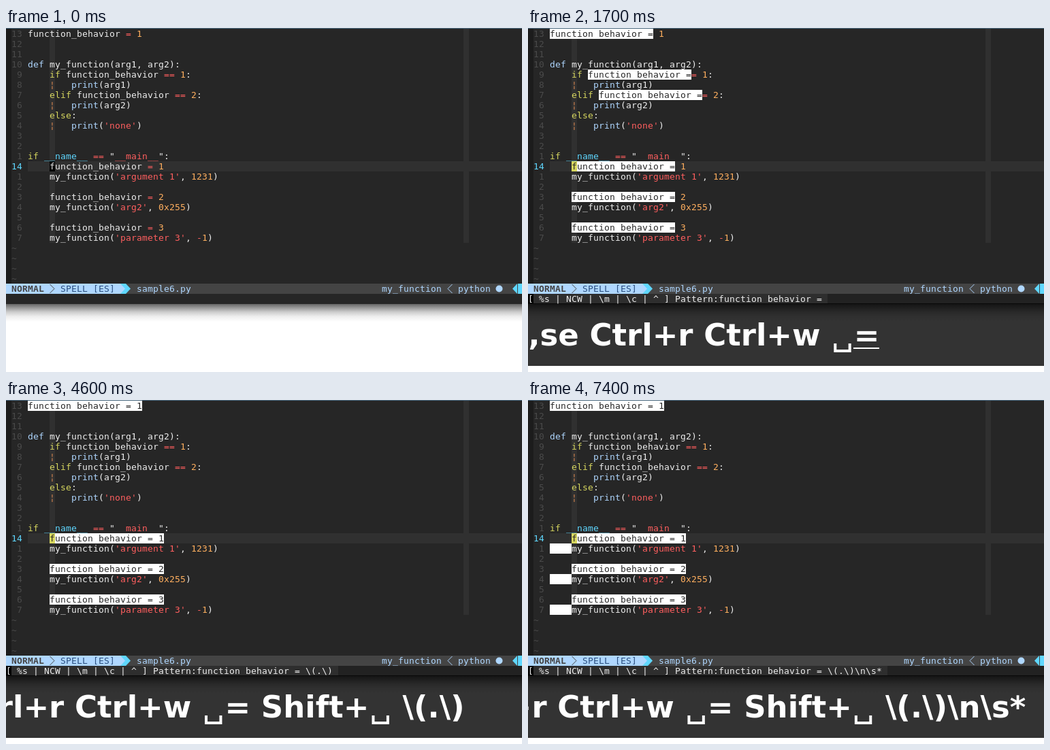
Write an HTML page with a canvas that moves like this. It is 758 by 506 pixels and loops after 8000 ms.

```html
<!DOCTYPE html>
<html lang="en">
<head>
<meta charset="utf-8">
<title>Search pattern in an editor</title>
<style>
  html, body { margin: 0; width: 100%; height: 100%; overflow: hidden; background: #fff; }
  canvas { display: block; }
</style>
</head>
<body>
<canvas id="stage" width="758" height="506"></canvas>
<script>
const ctx = document.getElementById("stage").getContext("2d");
const LOOP = 8000, W = 758, H = 506;
const CELL = 8, ROW = 15, TOP = 1, GUTTER = 32, CURSOR_ROW = 13;
const MONO = '13px "DejaVu Sans Mono", monospace';
const CAPTION = { size: 45, center: 258.4, baseline: 467, boxWidth: 33.4 };

const C = {
  bg: "#262626", fold: "#1c1c1c", line: "#303030", text: "#eeeeee", dim: "#4a4a4a",
  red: "#ff5f5f", yellow: "#d7d75f", orange: "#ffaf5f", pale: "#afd7ff",
  cyan: "#5fd7ff", bar: "#444444", guide: "#d78750", panel: "#333333"
};

const code = `function_behavior = 1


def my_function(arg1, arg2):
    if function_behavior == 1:
    ¦   print(arg1)
    elif function_behavior == 2:
    ¦   print(arg2)
    else:
    ¦   print('none')


if __name__ == "__main__":
    function_behavior = 1
    my_function('argument 1', 1231)

    function_behavior = 2
    my_function('arg2', 0x255)

    function_behavior = 3
    my_function('parameter 3', -1)`;
const lines = code.split("\n");

const syntax = [
  [/'[^']*'|(__)?main(__)?/, C.red],
  [/\b(?:if|elif|else)\b/, C.yellow],
  [/\b(?:print|def)\b/, C.pale],
  [/__name__/, C.cyan],
  [/==?|-/, C.red],
  [/\b\d\w*/, C.orange],
  [/¦/, C.guide]
];

// time, key shown, text typed, typing lag, time at which the underline goes
const keys = [
  [300, ",", "", 0],
  [300, "s", "", 0],
  [500, "e", "", 0, 700],
  [1000, " Ctrl+r", "", 0],
  [1200, " Ctrl+w", "function_behavior", 0],
  [1400, " ␣", " ", 0],
  [1600, "=", "=", 100],
  [1900, " Shift+␣", " ", 0, 2100],
  [2300, " \\", "\\", 0],
  [3100, "(", "(", 0],
  [3200, ".", ".", 0],
  [3900, "\\", "\\", 0, 4100],
  [4400, ")", ")", 0, 4600],
  [5800, "\\", "\\", 100],
  [6100, "n", "n", 100, 6400],
  [6600, "\\", "\\", 0],
  [6700, "s", "s", 0, 6900],
  [7200, "*", "*", 0, 7400]
].map(([at, label, typed, lag, plainAt = LOOP]) => ({ at, label, typed, lag, plainAt }));

const rowTop = row => TOP + row * ROW;

function rect(x, y, w, h, color) {
  ctx.fillStyle = color;
  ctx.fillRect(x, y, w, h);
}

function shape(points, color) {
  ctx.fillStyle = color;
  ctx.beginPath();
  points.forEach(([x, y]) => ctx.lineTo(x, y));
  ctx.fill();
}

function stroke(points, color, width) {
  ctx.strokeStyle = color;
  ctx.lineWidth = width;
  ctx.beginPath();
  points.forEach(([x, y]) => ctx.lineTo(x, y));
  ctx.stroke();
}

function cells(text, x, row, color, bold) {
  ctx.font = (bold ? "bold " : "") + MONO;
  ctx.fillStyle = color;
  [...text].forEach((ch, i) => ctx.fillText(ch, x + i * CELL, rowTop(row) + 12));
}

function lineColors(line) {
  const colors = Array(line.length).fill(C.text);
  const any = new RegExp(syntax.map(([re]) => `(?:${re.source})`).join("|"), "g");
  for (const m of line.matchAll(any)) {
    const [, color] = syntax.find(([re]) => new RegExp(`^(?:${re.source})$`).test(m[0]));
    colors.fill(color, m.index, m.index + m[0].length);
  }
  return colors;
}

// Indices of the matched characters; an unfinished pattern matches nothing.
function findHits(pattern) {
  const hits = new Set();
  if (!pattern) return hits;
  try {
    const source = pattern.replace(/\\([()])/g, "$1").replace(/\\s/g, "[ \\t]");
    for (const m of code.matchAll(new RegExp(source, "g"))) {
      for (let i = 0; i < m[0].length; i++) hits.add(m.index + i);
    }
  } catch (e) { /* incomplete pattern */ }
  return hits;
}

function drawCode(pattern, prompting) {
  const hits = findHits(pattern);
  rect(0, 0, W, 406, C.bg);
  rect(0, 0, W, 1, "#4a687f");
  rect(0, 1, 8, 375, C.fold);
  rect(64, 1, CELL, lines.length * ROW, C.line);
  rect(672, 1, CELL, lines.length * ROW, C.line);
  rect(GUTTER, rowTop(CURSOR_ROW), W - GUTTER, ROW, C.line);

  let index = 0;
  lines.forEach((line, row) => {
    const current = row === CURSOR_ROW;
    const number = current ? 14 : Math.abs(row - CURSOR_ROW);
    cells(String(number).padStart(2), 8, row, current ? C.cyan : C.dim);

    const shown = hits.size ? line.replace("__main__", "  main  ") : line;
    const colors = lineColors(shown);
    [...shown].forEach((ch, col) => {
      const x = GUTTER + col * CELL;
      const hit = hits.has(index + col);
      const cursor = current && col === 4;
      if (hit) rect(x, rowTop(row), CELL, ROW, "#fff");
      if (cursor) rect(x, rowTop(row), CELL, ROW, prompting ? C.yellow : "#000");
      const dark = hit || (cursor && prompting);
      cells(hit && ch === "_" ? " " : ch, x, row, dark ? C.bg : colors[col]);
    });
    index += line.length + 1;
  });
  for (let row = lines.length; row < 25; row++) cells("~", 8, row, C.dim);
}

function drawStatus() {
  const row = 25, y = rowTop(row), mid = y + ROW / 2, end = y + ROW;
  rect(0, y, W, ROW, C.bar);
  rect(0, y, 168, ROW, C.pale);
  rect(168, y, 8, ROW, C.cyan);
  shape([[168, y], [175, mid], [168, end]], C.pale);
  shape([[176, y], [183, mid], [176, end]], C.cyan);
  stroke([[64.5, y + 1], [71, mid], [64.5, end - 1]], C.bar, 1);
  cells("NORMAL", 8, row, C.bar, true);
  cells("SPELL [ES]", 80, row, "#2b5080");
  cells("sample6.py", 192, row, C.pale);
  cells("my_function", 552, row, C.pale);
  stroke([[655.5, y + 1], [649, mid], [655.5, end - 1]], C.pale, 1);
  cells("python", 664, row, C.pale);
  ctx.fillStyle = C.pale;
  ctx.beginPath();
  ctx.arc(724.5, mid, 5, 0, Math.PI * 2);
  ctx.fill();
  shape([[751, y], [744, mid], [751, end]], C.cyan);
  rect(752, y, 6, ROW, C.cyan);
}

function drawPrompt(pattern) {
  const text = "[ %s | NCW | \\m | \\c | ^ ] Pattern:" + pattern.replace(/_/g, " ");
  const y = rowTop(26);
  rect(0, y, W, ROW, "#222222");
  rect(CELL, y, text.length * CELL, ROW - 1, "#2e2e2e");
  rect(0, y, CELL, ROW, "#000");
  rect(0, y + ROW - 1, W, 1, "#080808");
  cells(text, 0, 26, C.text);
}

const captionWidth = text => [...text].reduce(
  (sum, ch) => sum + (ch === "␣" ? CAPTION.boxWidth : ctx.measureText(ch).width), 0);

function drawCaption(shown, t) {
  ctx.font = `bold ${CAPTION.size}px "DejaVu Sans", sans-serif`;
  ctx.fontKerning = "none";
  const text = shown.map(k => k.label).join("");
  const width = captionWidth(text);
  const { center, baseline, boxWidth } = CAPTION;
  let x = center - width / 2;
  ctx.fillStyle = "#fff";
  for (const part of text.split(/(␣)/)) {
    if (part === "␣") {
      const left = x + 6, right = x + boxWidth - 6;
      stroke([[left, 464], [left, 475], [right, 475], [right, 464]], "#fff", 4);
    } else {
      ctx.fillText(part, x, baseline);
    }
    x += captionWidth(part);
  }
  const last = shown[shown.length - 1];
  if (t < last.plainAt) {
    const right = Math.round(center + width / 2 - 0.2);
    const length = Math.round(captionWidth(last.label.trim()));
    rect(right - length, 470, length, 2, "#fff");
  }
}

function drawShadow() {
  const shade = ctx.createLinearGradient(0, 406, 0, 432);
  [[0, 0.6], [0.2, 0.42], [0.45, 0.2], [0.7, 0.07], [1, 0]]
    .forEach(([stop, alpha]) => shade.addColorStop(stop, `rgba(0,0,0,${alpha})`));
  rect(0, 406, W, 26, shade);
}

function draw(t) {
  const shown = keys.filter(k => t >= k.at);
  const pattern = keys.filter(k => t >= k.at + k.lag).map(k => k.typed).join("");
  const prompting = t >= 500;
  rect(0, 0, W, H, "#fff");
  if (shown.length) rect(0, 406, W, 91, C.panel);
  drawShadow();
  drawCode(pattern, prompting);
  drawStatus();
  if (prompting) drawPrompt(pattern);
  if (shown.length) drawCaption(shown, t);
}

const start = performance.now();
function tick() {
  draw((performance.now() - start) % LOOP);
  requestAnimationFrame(tick);
}
tick();
</script>
</body>
</html>
```
